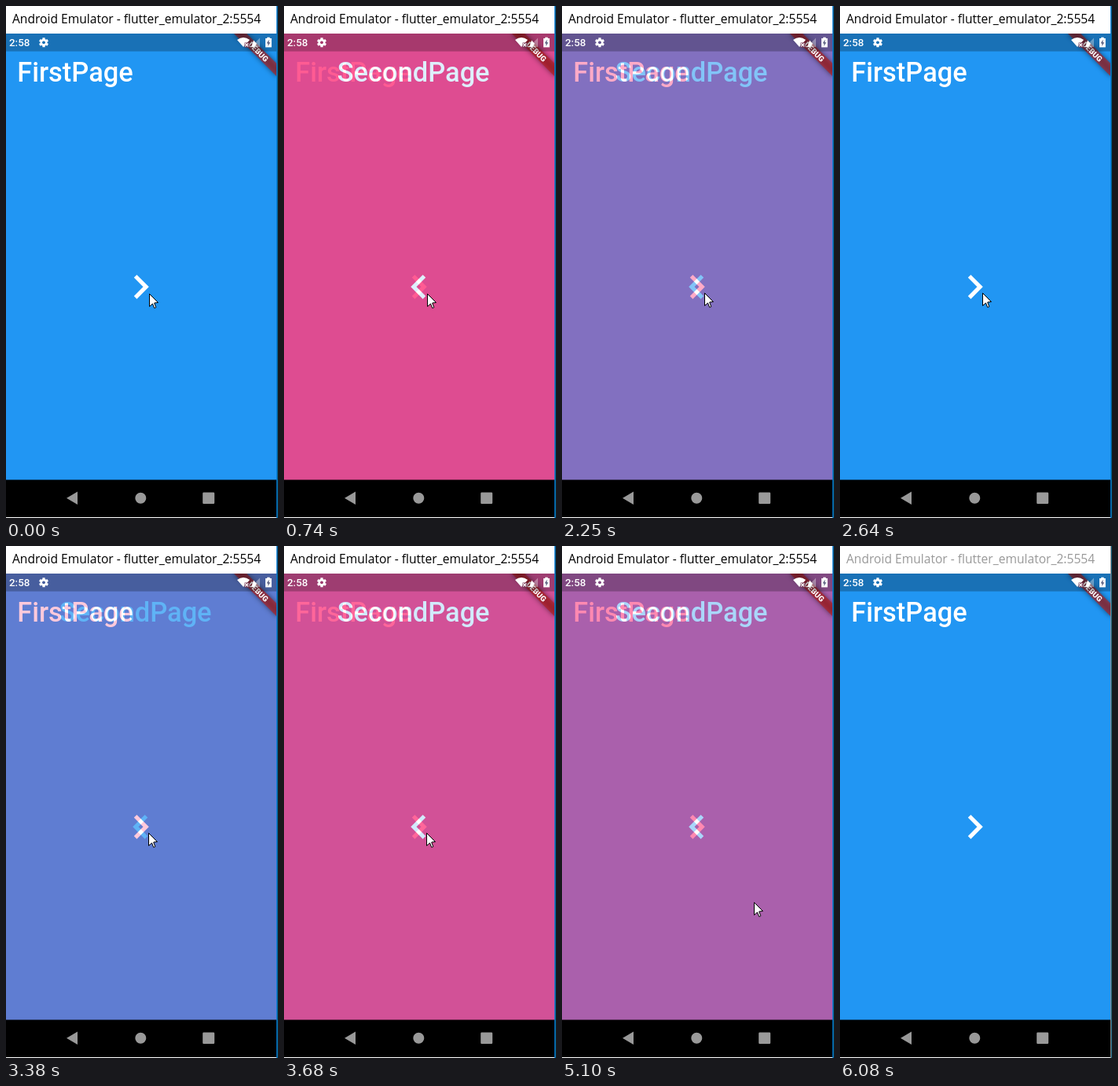
An HTML page with a canvas that plays this animation: 346x650 px, repeating every 6.18 s.

```html
<!DOCTYPE html>
<html>
<head>
<meta charset="utf-8">
<title>Page fade</title>
<style>
html, body { margin: 0; width: 100%; height: 100%; overflow: hidden; background: #fff; }
canvas { display: block; }
</style>
</head>
<body>
<canvas id="stage" width="346" height="650"></canvas>
<script>
const W = 346, H = 650, APP_W = 344, TOP = 35, NAV = 601.5, DP = APP_W / 360;
const LOOP = 6180, STEP = LOOP / 44;
const POINTER_END = 40 * STEP, BLUR_AT = 43 * STEP;
const ctx = document.getElementById('stage').getContext('2d');
const layer = document.createElement('canvas');
layer.width = W;
layer.height = H;
const layerCtx = layer.getContext('2d');

const FIRST = { color: '#2196f3', title: 'FirstPage', x: 14.3, dir: 1 };
const SECOND = { color: '#ff4081', title: 'SecondPage', x: 14.3 + 56 * DP, dir: -1 };

// Page transitions, alternately forward and back.
const FADES = [
  { start: 262, length: 765 },
  { start: 1647, length: 891 },
  { start: 3074, length: 1110 },
  { start: 4616, length: 736 }
];

// Pointer path: step, x, y.
const PATH = [[8, 182, 365], [9, 181, 364], [33, 182, 364], [34, 247, 374],
  [36, 244, 452], [38, 334, 592], [39, 338, 629]];

// cubic-bezier(0.4, 0, 0.2, 1)
function ease(x) {
  if (x <= 0 || x >= 1) return x <= 0 ? 0 : 1;
  let lo = 0, hi = 1;
  for (let i = 0; i < 24; i++) {
    const s = (lo + hi) / 2, r = 1 - s;
    if (1.2 * r * r * s + 0.6 * r * s * s + s * s * s < x) lo = s; else hi = s;
  }
  return lo * lo * (3 - 2 * lo);
}

// Opacity of the second page and strength of the button highlight.
function stateAt(t) {
  const i = FADES.filter(f => f.start <= t).length - 1;
  if (i < 0) return { p: 0, press: 0 };
  const age = t - FADES[i].start;
  const x = Math.min(1, age / FADES[i].length);
  return {
    p: ease(i % 2 ? 1 - x : x),
    press: age < 240 ? 0.15 * Math.sin(Math.PI * age / 240) : 0
  };
}

function pointerAt(step) {
  const next = PATH.findIndex(k => k[0] >= step);
  if (next === 0) return PATH[0].slice(1);
  const [a, ax, ay] = PATH[next - 1], [b, bx, by] = PATH[next];
  const u = (step - a) / (b - a);
  return [Math.floor(ax + (bx - ax) * u), Math.round(ay + (by - ay) * u)];
}

function rect(c, color, x, y, w, h) {
  c.fillStyle = color;
  c.fillRect(x, y, w, h);
}

function poly(c, color, ...pts) {
  c.beginPath();
  for (let i = 0; i < pts.length; i += 2) c.lineTo(pts[i], pts[i + 1]);
  c.closePath();
  c.fillStyle = color;
  c.fill();
}

function text(c, str, x, y, font, color) {
  c.font = font;
  c.fillStyle = color;
  c.fillText(str, x, y);
}

function drawPage(c, page, press) {
  rect(c, page.color, 0, TOP, APP_W, H - TOP);
  if (press) rect(c, `rgba(188,188,188,${press})`, 125, 326, 92, 61);
  text(c, page.title, page.x, 96, `500 ${36 * DP}px Roboto, sans-serif`, '#fff');
  c.save();
  c.translate(171.5, 356.6);
  c.scale(2.56 * page.dir, 2.56);
  poly(c, '#fff', -2, -6, -3.41, -4.59, 1.17, 0, -3.41, 4.59, -2, 6, 4, 0);
  c.restore();
}

function drawRibbon(c) {
  c.save();
  c.beginPath();
  c.rect(0, TOP, APP_W, NAV - TOP);
  c.clip();
  c.translate(APP_W, TOP);
  c.rotate(Math.PI / 4);
  c.scale(DP, DP);
  c.filter = 'blur(3px)';
  rect(c, 'rgba(0,0,0,0.5)', -40, 28, 80, 12);
  c.filter = 'none';
  rect(c, 'rgba(183,28,28,0.627)', -40, 28, 80, 12);
  c.textAlign = 'center';
  text(c, 'DEBUG', 0, 37.6, '900 10.2px Roboto, sans-serif', '#fff');
  c.restore();
}

function drawGear(c, x, y) {
  c.save();
  c.translate(x, y);
  for (let i = 0; i < 6; i++) {
    rect(c, '#fff', -1.6, -6, 3.2, 4);
    c.rotate(Math.PI / 3);
  }
  c.beginPath();
  c.arc(0, 0, 3.3, 0, 7);
  c.lineWidth = 2.4;
  c.strokeStyle = '#fff';
  c.stroke();
  c.restore();
}

function drawWifi(c) {
  c.beginPath();
  c.moveTo(302, 52);
  c.lineTo(294, 43);
  c.quadraticCurveTo(302, 37, 310, 43);
  c.fillStyle = '#fff';
  c.fill();
  rect(c, '#7b3d58', 303.5, 46.5, 6, 6);
  c.save();
  c.translate(306.2, 49.4);
  c.rotate(Math.PI / 4);
  rect(c, '#fff', -2.8, -0.65, 5.6, 1.3);
  rect(c, '#fff', -0.65, -2.8, 1.3, 5.6);
  c.restore();
}

function drawStatus(c) {
  rect(c, 'rgba(0,0,0,0.25)', 0, TOP, APP_W, 22.6);
  text(c, '2:58', 4, 51, `500 ${14 * DP}px Roboto, sans-serif`, '#fff');
  drawGear(c, 48, 46.3);
  drawWifi(c);
  poly(c, 'rgba(255,255,255,0.35)', 323, 40.5, 323, 52, 311.5, 52);
  poly(c, '#fff', 315, 43.5, 319, 48, 315.5, 52, 312, 52);
  rect(c, '#fff', 332.2, 39.7, 3.4, 2);
  rect(c, '#fff', 330, 41, 7.8, 11.4);
  poly(c, '#5a5f80', 334.6, 42.6, 331.6, 47.4, 333.4, 47.4, 333.2, 51, 336.2, 46.2, 334.4, 46.2);
}

function drawNav(c) {
  rect(c, '#000', 0, NAV, APP_W, H - NAV);
  poly(c, '#999', 77, 624.7, 91, 616.5, 91, 633);
  c.beginPath();
  c.arc(171.3, 624.7, 7, 0, 7);
  c.roundRect(250.2, 617.5, 15, 14.5, 1.2);
  c.fill();
}

function drawPointer(c, x, y) {
  c.save();
  c.translate(x + 0.5, y + 0.5);
  poly(c, '#fff', 0, 0, 0, 16, 4, 12.5, 6.2, 18, 8.3, 17.2, 6.2, 11.5, 11, 11);
  c.lineWidth = 1;
  c.strokeStyle = '#000';
  c.stroke();
  c.restore();
}

function draw(step) {
  const t = step * STEP;
  const { p, press } = stateAt(t);
  const active = t < BLUR_AT;
  rect(ctx, '#fff', 0, 0, W, H);
  text(ctx, 'Android Emulator - flutter_emulator_2:5554', 8, 22,
    '15.6px "Open Sans", sans-serif', active ? '#000' : '#999');

  drawPage(ctx, FIRST, press);
  if (p > 0) {
    drawPage(layerCtx, SECOND, press);
    ctx.globalAlpha = p;
    ctx.drawImage(layer, 0, 0);
    ctx.globalAlpha = 1;
  }
  drawRibbon(ctx);
  drawStatus(ctx);
  drawNav(ctx);

  rect(ctx, '#fff', 0, H - 1, APP_W, 1);
  rect(ctx, active ? '#0078d7' : '#8a8a8a', APP_W, 0, 1, H);
  rect(ctx, '#0b5a78', APP_W + 1, 0, 1, H);
  if (t < POINTER_END) drawPointer(ctx, ...pointerAt(step));
}

const begin = performance.now();
let shown = -1;
function loop() {
  const step = Math.floor((performance.now() - begin) % LOOP / STEP);
  if (step !== shown) draw(shown = step);
  requestAnimationFrame(loop);
}
loop();
</script>
</body>
</html>
```
